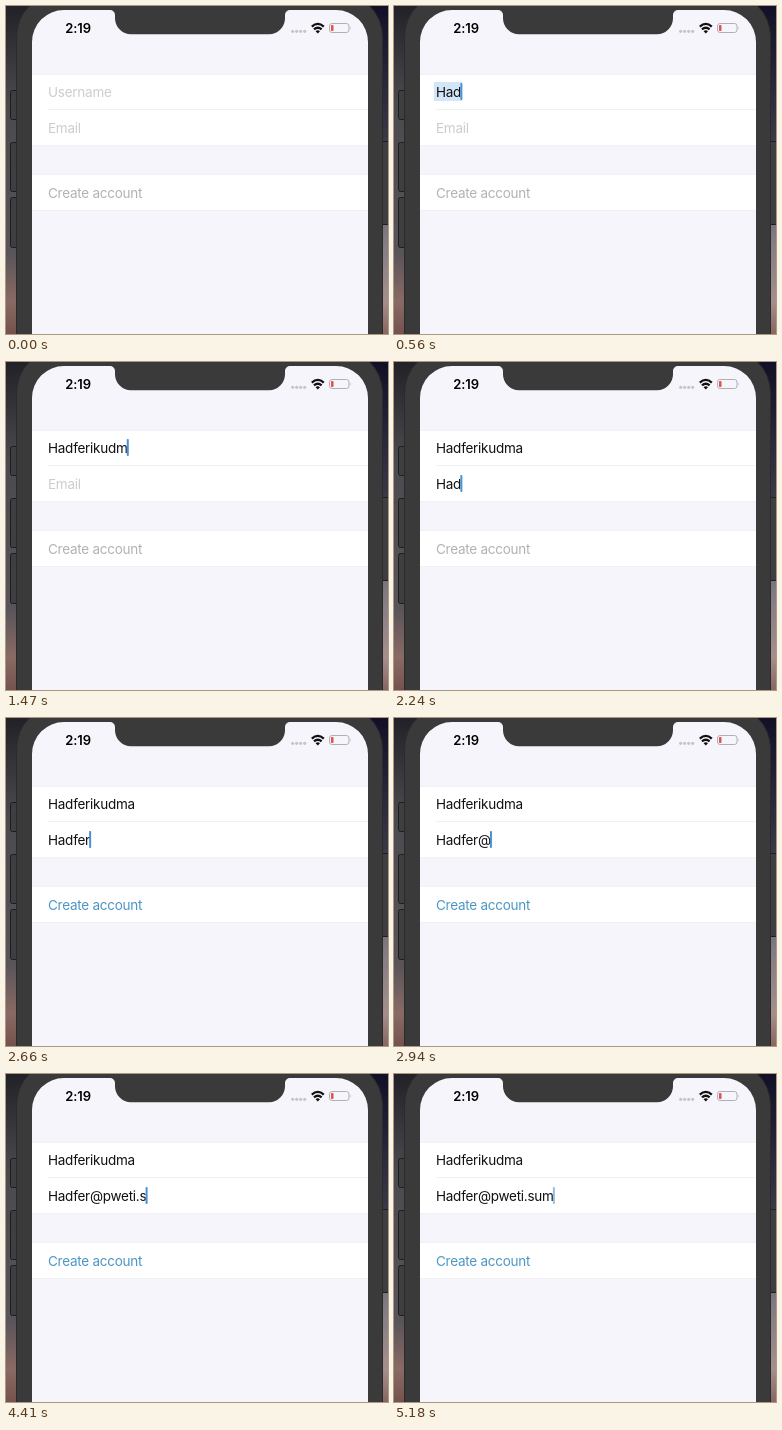
Recreate the animation shown at these times as an HTML page. Size 382x328 px, loop 5250 ms.

```html
<!DOCTYPE html>
<html lang="en">
<head>
<meta charset="utf-8">
<title>Sign-up form</title>
<style>
  html, body { margin: 0; width: 100%; height: 100%; overflow: hidden; background: #333; }
  svg { display: block; width: 382px; height: 328px; }
  text { font: 400 13.5px Inter, "Open Sans", sans-serif; letter-spacing: -.25px; white-space: pre; }
  .time { font-weight: 600; font-size: 13px; letter-spacing: -.1px; }
  .buttons { fill: #3f3f42; stroke: #1d1d20; }
  .line { fill: #f1f0f4; }
</style>
</head>
<body>
<svg viewBox="0 0 382 328">
  <defs>
    <linearGradient id="left" x2="0" y2="1">
      <stop offset="0" stop-color="#222127"/>
      <stop offset=".3" stop-color="#4b4a4e"/>
      <stop offset=".75" stop-color="#58545a"/>
      <stop offset=".9" stop-color="#8a6a64"/>
      <stop offset="1" stop-color="#75524d"/>
    </linearGradient>
    <linearGradient id="right" x2="0" y2="1">
      <stop offset="0" stop-color="#111026"/>
      <stop offset=".4" stop-color="#3a3846"/>
      <stop offset=".7" stop-color="#817a82"/>
      <stop offset=".9" stop-color="#a58f8c"/>
      <stop offset="1" stop-color="#8a6660"/>
    </linearGradient>
  </defs>

  <!-- Wallpaper and phone body -->
  <rect width="191" height="328" fill="url(#left)"/>
  <rect x="191" width="191" height="328" fill="url(#right)"/>
  <g class="buttons">
    <rect x="4.5" y="84.5" width="9" height="29" rx="2"/>
    <rect x="4.5" y="136.5" width="9" height="49" rx="2"/>
    <rect x="4.5" y="191.5" width="9" height="50" rx="2"/>
    <rect x="372" y="135.5" width="11" height="83" rx="2"/>
  </g>
  <rect x="10.5" y="-13" width="366" height="400" rx="44" fill="#3a3a3a" stroke="#2b2b2d"/>
  <path d="M26 328V36A32 32 0 0 1 58 4H104A5 5 0 0 1 109 9V12.2A16 16 0 0 0 125 28.2H263A16 16 0 0 0 279 12.2V9A5 5 0 0 1 284 4H330A32 32 0 0 1 362 36V328Z" fill="#f6f5fb"/>

  <!-- Status bar -->
  <text class="time" x="59.3" y="27">2:19</text>
  <g fill="#c6c5ca">
    <circle cx="286.7" cy="25.3" r="1.6"/>
    <circle cx="290.7" cy="25.3" r="1.6"/>
    <circle cx="294.7" cy="25.3" r="1.6"/>
    <circle cx="298.7" cy="25.3" r="1.6"/>
  </g>
  <g fill="none" stroke="#111" stroke-width="2.3">
    <path d="M305.8 20.6Q311.8 15.2 317.8 20.6"/>
    <path d="M308 23.4Q311.8 20 315.6 23.4"/>
  </g>
  <path d="M309.6 25.2Q311.8 23.4 314 25.2L311.8 27.6Z" fill="#111"/>
  <rect x="323.5" y="17.5" width="19.5" height="9" rx="2.5" fill="none" stroke="#b1b0b5"/>
  <path d="M344.3 20.2Q345.7 22 344.3 23.8Z" fill="#b1b0b5"/>
  <rect x="325" y="19" width="2.5" height="6" rx=".8" fill="#e2514c"/>

  <!-- Form -->
  <rect class="line" x="26" y="68" width="336" height="72"/>
  <rect x="26" y="69" width="336" height="70" fill="#fff"/>
  <rect class="line" x="42" y="103" width="320" height="1"/>
  <rect class="line" x="26" y="168" width="336" height="37"/>
  <rect x="26" y="169" width="336" height="35" fill="#fff"/>
  <rect id="mark" x="40" y="76" height="19" fill="#d3e6f8"/>
  <text id="user" x="42" y="90.5"></text>
  <text id="mail" x="42" y="126.5"></text>
  <text id="create" x="42" y="191.5">Create account</text>
  <rect id="caret" width="2" height="17" rx=".8" fill="#4a90d4"/>
</svg>

<script>
const LOOP = 5250;
const $ = id => document.getElementById(id);
const clamp = v => Math.max(0, Math.min(1, v));

// Each entry in keys is the moment one more character appears.
const fields = [
  { el: $("user"), hint: "Username", value: "Hadferikudma", top: 77,
    keys: [70, 210, 350, 700, 700, 910, 980, 1120, 1190, 1260, 1470, 1540] },
  { el: $("mail"), hint: "Email", value: "Hadfer@pweti.sum", top: 113,
    keys: [2030, 2170, 2240, 2380, 2520, 2660, 2870, 3150, 3500, 3780,
           3920, 4060, 4270, 4410, 4550, 4620] }
];

function type({ el, hint, value, keys }, t) {
  const n = keys.filter(k => k <= t).length;
  el.textContent = n ? value.slice(0, n) : hint;
  el.setAttribute("fill", n ? "#111" : "#cdcdd0");
  return 42 + (n ? el.getComputedTextLength() : 0);
}

function mix(a, b, p) {
  return `rgb(${a.map((v, i) => Math.round(v + (b[i] - v) * p))})`;
}

function draw(t) {
  const ends = fields.map(f => type(f, t));
  const active = t < 1820 ? 0 : 1;
  const caret = $("caret");
  caret.setAttribute("x", ends[active] - .8);
  caret.setAttribute("y", fields[active].top);
  caret.setAttribute("opacity", t < 70 ? 0 : 1 - clamp((t - 5040) / 350));

  const marked = t >= 560 && t < 910;
  $("mark").setAttribute("width", marked ? ends[0] - 39 : 0);
  $("create").setAttribute("fill",
    mix([178, 178, 180], [76, 150, 196], clamp((t - 2310) / 280)));
}

function tick() {
  draw(performance.now() % LOOP);
  requestAnimationFrame(tick);
}
tick();
</script>
</body>
</html>
```
